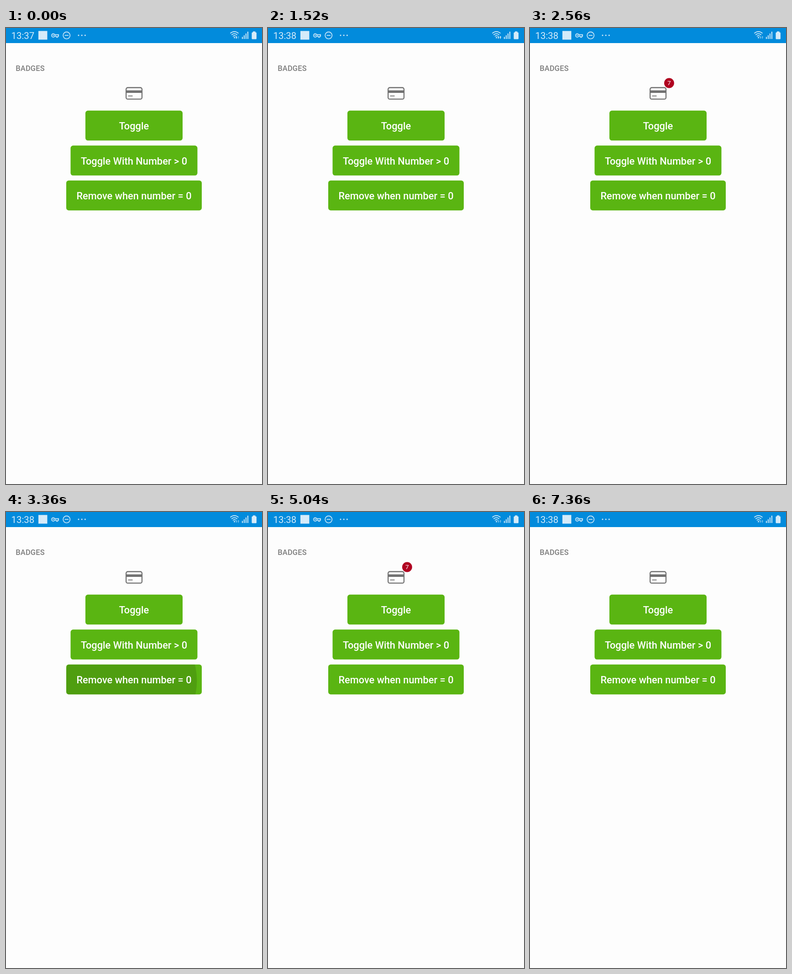
An HTML page for the animation above (7.6 s loop, 561 px wide and 998 px high).

```html
<!DOCTYPE html>
<html lang="en">
<head>
<meta charset="utf-8">
<title>Badges</title>
<style>
  html, body { margin: 0; width: 100%; height: 100%; overflow: hidden; background: #fdfdfd; }
  svg { display: block; width: 561px; height: 998px; font-family: Roboto, sans-serif; }
  .label { font-size: 21.8px; font-weight: 500; fill: #fff; text-anchor: middle; }
  .line { fill: none; stroke: #d5ebf9; }
</style>
</head>
<body>
<svg viewBox="0 0 561 998">
  <rect width="561" height="998" fill="#fdfdfd"/>
  <rect width="561" height="33" fill="#028bdc"/>

  <g fill="#d5ebf9">
    <text id="clock" x="11.5" y="24" font-size="20.4">13:37</text>
    <rect x="71" y="6.5" width="19.5" height="19"/>
    <g class="line" stroke-width="1.6">
      <circle cx="103.5" cy="16.3" r="3.7"/>
      <path d="M107 14.6H115.2V18H113.4V20.2H110.4V18H107"/>
      <circle cx="132.8" cy="16.2" r="7.6"/>
      <path d="M128.6 16.2H137"/>
    </g>
    <circle cx="103.5" cy="16.3" r="1.3"/>
    <circle cx="159" cy="16" r="1.5"/>
    <circle cx="166.2" cy="16" r="1.5"/>
    <circle cx="173.4" cy="16" r="1.5"/>
    <g class="line" stroke-width="1.7">
      <path d="M491.5 11.6Q500.5 4.2 509.5 11.6"/>
      <path d="M494.3 15Q500.5 9.6 506.7 15"/>
      <path d="M497.2 18.3Q500.5 15.2 503.5 18"/>
    </g>
    <circle cx="500.6" cy="21" r="1.5"/>
    <path id="down" d="M504.1 17.5h1.6v3.2h1.4l-2.2 2.9-2.2-2.9h1.4z"/>
    <path id="up" d="M508.5 23.5h1.6v-3.2h1.4l-2.2-2.9-2.2 2.9h1.4z"/>
    <path d="M517 19.5h2v4.5h-2zM521 16h2v8h-2zM525 12h2v12h-2zM529 8h2v16h-2z"/>
    <path d="M541 7.5h5.5v2h1a1.5 1.5 0 0 1 1.5 1.5v12a1.5 1.5 0 0 1-1.5 1.5h-7.5a1.5 1.5 0 0 1-1.5-1.5v-12a1.5 1.5 0 0 1 1.5-1.5h1z"/>
  </g>

  <text x="21.3" y="94" font-size="16.4" font-weight="500" letter-spacing=".2" fill="#7d7d7d">BADGES</text>

  <g fill="none" stroke="#717171">
    <rect x="263.2" y="130.5" width="34.8" height="25.2" rx="3.8" stroke-width="2.3"/>
    <path d="M263 139.2H298" stroke-width="5.6"/>
    <path d="M267.5 148.7H277.5" stroke-width="1.8"/>
  </g>

  <g id="buttons"></g>

  <circle id="dot" cx="302.3" cy="120.5" r="5.5" fill="#b00020"/>
  <g id="count">
    <circle cx="304.9" cy="120.5" r="10.9" fill="#b00020"/>
    <text x="304.9" y="125.4" font-size="13.6" fill="#fff" text-anchor="middle">7</text>
  </g>
</svg>

<script>
const LOOP = 7600, STEP = 80;
const GROW = 225, FADE_IN = 75, FADE_OUT = 150, CLICK_DELAY = 110;
const CENTER_X = 280.5, HEIGHT = 65.5;
const byId = id => document.getElementById(id);

const buttons = [
  { label: 'Toggle', y: 180.8, width: 213 },
  { label: 'Toggle With Number > 0', y: 257.3, width: 278 },
  { label: 'Remove when number = 0', y: 333.7, width: 297 }
];

// start time, button index, badge shown after the click
const taps = [
  [300, 0, 'dot'],
  [940, 0, ''],
  [1994, 1, 'count'],
  [3225, 2, ''],
  [4620, 1, 'count'],
  [5700, 2, '']
];

// time, down arrow opacity, up arrow opacity
const traffic = [
  [0, 1, .4], [1520, 1, 1], [1920, .55, .55], [5600, .55, .75], [6320, .55, .55]
];

byId('buttons').innerHTML = buttons.map(({ label, y, width }, i) => {
  const box = `<rect x="${CENTER_X - width / 2}" y="${y}" width="${width}" height="${HEIGHT}" rx="5.5"`;
  return `<clipPath id="clip${i}">${box}/></clipPath>${box} fill="#5ab512"/>
    <g clip-path="url(#clip${i})"><circle id="ripple${i}"/></g>
    <text class="label" x="${CENTER_X}" y="${y + 41.2}">${label.replace('>', '&gt;')}</text>`;
}).join('');

// cubic-bezier(.4, 0, .2, 1)
function ease(x) {
  let lo = 0, hi = 1;
  for (let i = 0; i < 24; i++) {
    const u = (lo + hi) / 2, v = 1 - u;
    if (1.2 * v * v * u + .6 * v * u * u + u ** 3 < x) lo = u; else hi = u;
  }
  return lo * lo * (3 - 2 * lo);
}

function drawRipple(index, age) {
  const { y, width } = buttons[index];
  const p = ease(Math.min(1, age / GROW));
  const from = .3 * width, to = Math.hypot(width, HEIGHT) / 2;
  const fade = Math.min(1, age / FADE_IN, 1 - (age - GROW) / FADE_OUT);
  const ripple = byId('ripple' + index);
  ripple.setAttribute('cx', CENTER_X - 52 * (1 - p));
  ripple.setAttribute('cy', y + HEIGHT / 2 + 22 * (1 - p));
  ripple.setAttribute('r', from + (to - from) * p);
  ripple.setAttribute('opacity', .125 * fade);
}

function draw(time) {
  let badge = '';
  buttons.forEach((_, i) => byId('ripple' + i).setAttribute('opacity', 0));
  for (const [start, index, result] of taps) {
    const age = time - start;
    if (age >= CLICK_DELAY) badge = result;
    if (age >= 0 && age < GROW + FADE_OUT) drawRipple(index, age);
  }
  for (const id of ['dot', 'count']) {
    byId(id).setAttribute('visibility', badge === id ? 'visible' : 'hidden');
  }
  byId('clock').textContent = time < 1120 ? '13:37' : '13:38';
  const [, down, up] = traffic.filter(row => row[0] <= time).pop();
  byId('down').setAttribute('opacity', down);
  byId('up').setAttribute('opacity', up);
}

const origin = performance.now();
function tick() {
  const time = (performance.now() - origin) % LOOP;
  draw(Math.floor(time / STEP) * STEP);
  requestAnimationFrame(tick);
}
tick();
</script>
</body>
</html>
```
